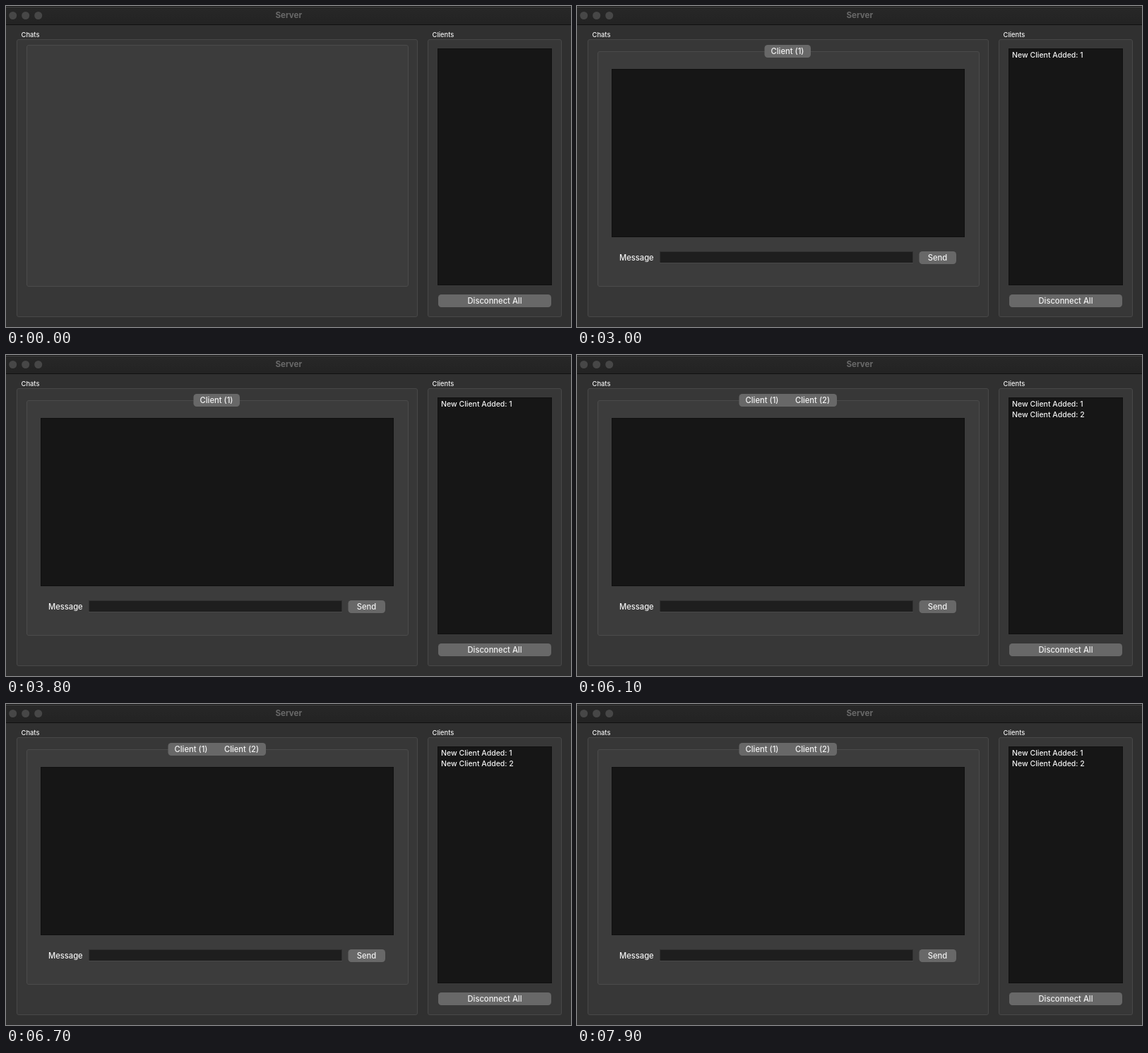
An HTML page that plays this animation: 800 px wide and 454 px high, repeating every 8000 ms.

```html
<!DOCTYPE html>
<html lang="en">
<head>
<meta charset="utf-8">
<title>Server</title>
<style>
  html, body { margin: 0; width: 100%; height: 100%; overflow: hidden; background: #303030; }
  svg { display: block; width: 100%; height: 100%; }
  text { font: 500 11.2px Inter, "Open Sans", sans-serif; fill: #f2f2f2; }
  .mid { text-anchor: middle; }
  .title { font-size: 11.6px; font-weight: 700; fill: #686868; }
  .label { font-size: 9.4px; }
  .log { font-size: 10.5px; }
  .group { fill: #373737; stroke: #484848; }
  .pane { fill: #3c3c3c; stroke: #4b4b4b; }
  .well { fill: #161616; stroke: #101010; }
  .btn { fill: #686868; }

  .empty, .active, .one, .two { animation: 8s step-end infinite; }
  .empty { animation-name: empty; }
  .active { animation-name: active; }
  .one { animation-name: one; }
  .two { animation-name: two; }
  @keyframes empty { 0% { opacity: 1; } 5%, 100% { opacity: 0; } }
  @keyframes active { 0% { opacity: 0; } 5%, 100% { opacity: 1; } }
  @keyframes one { 0% { opacity: 1; } 65%, 100% { opacity: 0; } }
  @keyframes two { 0% { opacity: 0; } 65%, 100% { opacity: 1; } }
</style>
</head>
<body>
<svg viewBox="0 0 800 454">
  <defs>
    <linearGradient id="bar" x2="0" y2="1">
      <stop stop-color="#282828"/>
      <stop offset="1" stop-color="#232323"/>
    </linearGradient>
  </defs>

  <rect width="800" height="454" fill="#303030"/>
  <rect width="800" height="26" fill="url(#bar)"/>
  <rect width="800" height="1" fill="#151515"/>
  <rect y="1" width="800" height="1" fill="#434343"/>
  <rect y="26" width="800" height="1" fill="#101010"/>
  <g fill="#474747">
    <circle cx="9.7" cy="13.5" r="5.5"/>
    <circle cx="27.7" cy="13.5" r="5.5"/>
    <circle cx="45.7" cy="13.5" r="5.5"/>
  </g>
  <text class="title mid" x="400.3" y="17.4">Server</text>

  <text class="label" x="21.5" y="44">Chats</text>
  <rect class="group" x="15.5" y="47.5" width="567" height="392" rx="2.5"/>
  <text class="label" x="603.5" y="44">Clients</text>
  <rect class="group" x="597.5" y="47.5" width="189" height="392" rx="2.5"/>
  <rect class="well" x="611.5" y="60.5" width="161" height="334"/>
  <rect class="btn" x="612" y="408" width="160" height="18" rx="4.5"/>
  <text class="mid" x="692" y="421">Disconnect All</text>

  <rect class="pane empty" x="29.5" y="55.5" width="540" height="341" rx="2.5"/>

  <g class="active">
    <rect class="pane" x="29.5" y="64.5" width="540" height="332" rx="2.5"/>
    <rect class="well" x="49.5" y="89.5" width="499" height="237"/>
    <text x="60" y="360">Message</text>
    <rect x="117.5" y="347.5" width="358" height="16" fill="#1e1e1e" stroke="#303030"/>
    <path d="M117 363.5H476" stroke="#484848"/>
    <rect class="btn" x="484.5" y="347" width="52.5" height="18" rx="4.5"/>
    <text class="mid" x="510.5" y="360">Send</text>
    <text class="log" x="616" y="73">New Client Added: 1</text>

    <g class="one">
      <rect class="btn" x="265.5" y="55" width="65.5" height="18" rx="4.5"/>
      <text class="mid" x="298" y="68">Client (1)</text>
    </g>
    <g class="two">
      <rect class="btn" x="229.5" y="55" width="138.5" height="18" rx="4.5"/>
      <text class="mid" x="262" y="68">Client (1)</text>
      <text class="mid" x="333.5" y="68">Client (2)</text>
      <text class="log" x="616" y="88">New Client Added: 2</text>
    </g>
  </g>
</svg>
</body>
</html>
```
